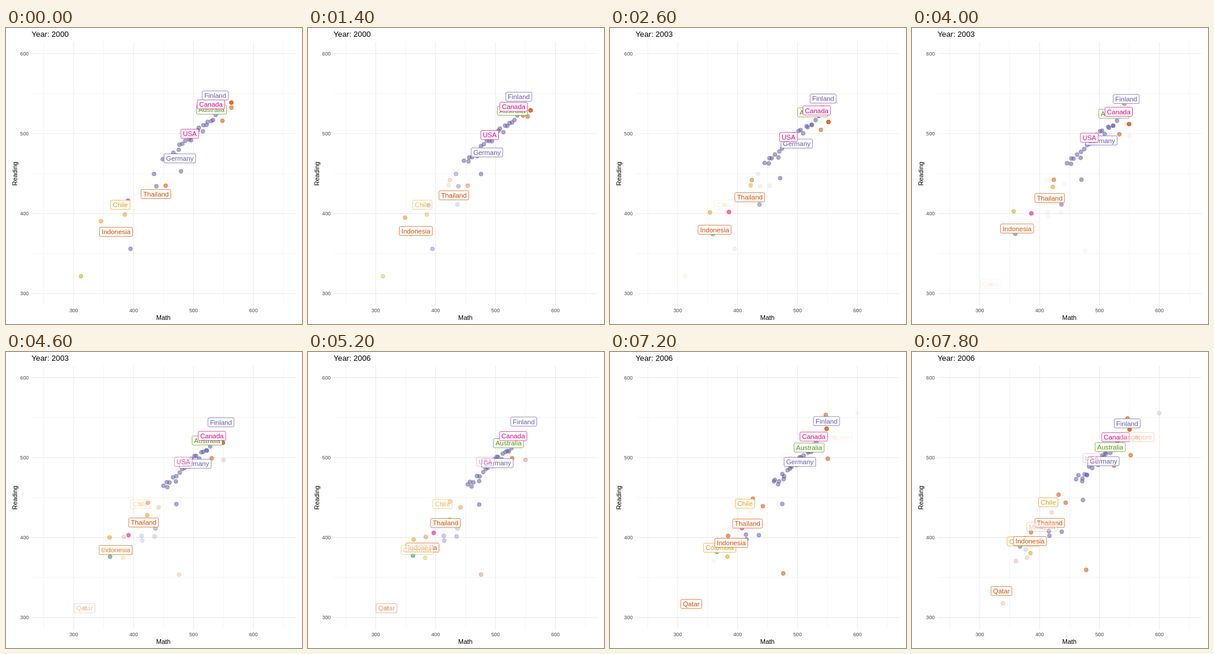
Write an HTML page with a canvas that moves like this. It is 504 px wide and 504 px high and loops after 8000 ms.

```html
<!DOCTYPE html>
<html lang="en">
<head>
<meta charset="utf-8">
<title>Reading and math scores</title>
<style>
  html, body { margin: 0; width: 100%; height: 100%; overflow: hidden; background: #fff; }
  canvas { display: block; }
</style>
</head>
<body>
<canvas id="stage" width="504" height="504"></canvas>
<script>
const ctx = document.getElementById("stage").getContext("2d");
const FONT = '"Liberation Sans", Arial, sans-serif';
const FRAME_MS = 200, FRAMES = 40, STEPS = 12, CYCLE = 16, LAST_STEPS = 4;
const AFRICA = "#1A9268", ASIA = "#D14E00", EUROPE = "#645DA7",
      NORTH = "#E0007F", OCEANIA = "#559712", SOUTH = "#E09E12";

// Extent of the European cluster in each survey, and its height at x = 310.
const SURVEYS = [
  { year: 2000, left: 268, right: 362, height: 193 },
  { year: 2003, left: 262, right: 358, height: 194 },
  { year: 2006, left: 277, right: 352, height: 198 },
  { year: 2009, left: 280, right: 352, height: 195 }
];

// Each country has one position per survey, beginning with survey number `first`.
const countries = [];
function add(name, color, first, ...path) {
  countries.push({ name, color, first, path });
}
const dot = (...args) => add("", ...args);

// A dot that joins in 2006 and then drifts with the general trend.
const newcomer = (color, x, y) => dot(color, 2, [x, y], [x + 2, y - 8]);

// Pseudo-random value from -1 to 1.
function jitter(seed) {
  const n = Math.sin(seed * 12.9898) * 43758.5453;
  return 2 * (n - Math.floor(n)) - 1;
}

function addCluster(count) {
  for (let i = 0; i < count; i++) {
    dot(EUROPE, 0, ...SURVEYS.map(({ left, right, height }, survey) => {
      const x = left + (right - left) * (i + 0.5) / count + 3 * jitter(i + 100 * survey);
      const y = height - 0.87 * (x - 310) + 8 * jitter(i + 50) + 4 * jitter(i + 70 * survey);
      return [x, y];
    }));
  }
}

addCluster(24);
dot(EUROPE, 0, [298, 244], [288, 258], [294, 261], [291, 252]);
dot(EUROPE, 0, [252, 248.5]);
dot(EUROPE, 0, [256, 269.5]);
dot(EUROPE, 0, [212, 376]);
dot(EUROPE, 1, [254.5, 300.5]);
newcomer(EUROPE, 231, 313);
newcomer(EUROPE, 232, 321);
newcomer(EUROPE, 253, 314);
dot(EUROPE, 3, [193.5, 336.5]);

dot(ASIA, 0, [272, 268.5]);
// Two countries share nearly the same scores.
for (let i = 0; i < 2; i++) {
  dot(ASIA, 0, [383.7, 127], [369.7, 166.6], [368.3, 130.3], [370.5, 132]);
}
dot(ASIA, 0, [384, 135.5], [354, 181], [343, 181], [344, 193.5]);
dot(ASIA, 0, [368.5, 158], [361, 131], [367.5, 105.3], [367, 113]);
dot(ASIA, 1, [241.5, 259], [241.5, 252], [249.5, 243]);
newcomer(ASIA, 370.3, 183.7);
newcomer(ASIA, 259.7, 264.6);
newcomer(ASIA, 200.6, 315);
newcomer(ASIA, 294.6, 379);
dot(ASIA, 3, [421, 104]);
dot(ASIA, 3, [238, 273]);
dot(ASIA, 3, [155, 428]);
dot(ASIA, 3, [196, 350]);

dot(AFRICA, 1, [175.3, 351], [181, 343.5], [184, 331]);
dot(NORTH, 0, [207.7, 294], [201.5, 317], [223, 301.5], [230, 295]);
dot(NORTH, 3, [177, 356]);
dot(SOUTH, 0, [127.7, 422.7]);
dot(SOUTH, 0, [202.3, 317.6]);
dot(SOUTH, 0, [161.7, 329], [172, 311], [185.5, 325.3], [193, 317]);
dot(SOUTH, 1, [239.5, 268], [242.5, 298], [243, 293]);
newcomer(SOUTH, 199.6, 350.5);

// Named countries, in drawing order
add("Australia", OCEANIA, 0, [350, 139], [344, 144.5], [339.5, 163], [337.5, 162]);
add("Canada", NORTH, 0, [349, 130], [352.5, 142.5], [347, 143.7], [346.5, 145]);
add("Chile", SOUTH, 0, [194.7, 301]);
add("Chile", SOUTH, 2, [229, 259], [232, 256]);
add("Colombia", SOUTH, 2, [186, 337], [189.5, 322.5]);
add("Finland", EUROPE, 0, [356.3, 114.8], [364.3, 121.3], [369.5, 116.4], [366.5, 121.5]);
add("Germany", EUROPE, 0, [296, 222], [322.4, 191.8], [322.4, 187.5], [326, 186]);
add("Indonesia", ASIA, 0, [187.4, 347], [176.2, 342.8], [208.3, 326], [201, 322]);
add("Malaysia", ASIA, 3, [221.3, 297.7]);
add("Qatar", ASIA, 2, [133.7, 436.3], [152.3, 407]);
add("Singapore", ASIA, 3, [382.7, 145]);
add("Thailand", ASIA, 0, [255.3, 282.7], [234.5, 289.3], [234, 292.5], [234.5, 291]);
add("USA", NORTH, 0, [313, 180], [302, 186.8]);
add("USA", NORTH, 3, [306.3, 180.5]);

function line(x1, y1, x2, y2, width) {
  ctx.strokeStyle = "#ebebeb";
  ctx.lineWidth = width;
  ctx.beginPath();
  ctx.moveTo(x1, y1);
  ctx.lineTo(x2, y2);
  ctx.stroke();
}

function text(value, x, y, size, color, align = "left") {
  ctx.font = `${size}px ${FONT}`;
  ctx.fillStyle = color;
  ctx.textAlign = align;
  ctx.fillText(value, x, y);
}

function drawChart(year) {
  ctx.globalAlpha = 1;
  ctx.fillStyle = "#fff";
  ctx.fillRect(0, 0, 504, 504);
  for (let x = 64.3; x < 493; x += 102) line(x, 23.5, x, 472, 0.53);
  for (let y = 111.6; y < 472; y += 136.2) line(43.5, y, 493, y, 0.53);
  for (let i = 0; i < 4; i++) {
    const x = 115.3 + 102 * i, y = 43.5 + 136.2 * i;
    line(x, 23.5, x, 472, 1.07);
    line(43.5, y, 493, y, 1.07);
    text(300 + 100 * i, x, 484, 8.8, "#4d4d4d", "center");
    text(600 - 100 * i, 38.7, y + 3.3, 8.8, "#4d4d4d", "right");
  }
  text("Year: " + year, 43.5, 15, 13.2, "#000");
  text("Math", 268, 497, 11, "#000", "center");
  ctx.save();
  ctx.translate(19, 248);
  ctx.rotate(-Math.PI / 2);
  text("Reading", 0, 0, 11, "#000", "center");
  ctx.restore();
}

function pose(country, segment, step) {
  const from = country.path[segment - country.first];
  const to = country.path[segment + 1 - country.first];
  const fade = step / STEPS;
  if (!from && !to) return null;
  if (!to) return { country, x: from[0], y: from[1], alpha: 1 - fade };
  if (!from) return { country, x: to[0], y: to[1], alpha: fade };
  // The last path entries hold the place reached when the loop is cut.
  const move = step / (segment === 2 ? LAST_STEPS : STEPS);
  return {
    country, alpha: 1,
    x: from[0] + (to[0] - from[0]) * move,
    y: from[1] + (to[1] - from[1]) * move
  };
}

// The translucent outline overlaps the fill, which gives a darker rim.
function drawPoint({ country, x, y, alpha }) {
  ctx.globalAlpha = 0.53 * alpha;
  ctx.fillStyle = ctx.strokeStyle = country.color;
  ctx.lineWidth = 0.9;
  ctx.beginPath();
  ctx.arc(x, y, 3.4, 0, 2 * Math.PI);
  ctx.fill();
  ctx.stroke();
}

function drawLabel({ country, x, y, alpha }) {
  ctx.globalAlpha = alpha;
  ctx.font = `11.38px ${FONT}`;
  const width = ctx.measureText(country.name).width + 7, height = 15.5;
  ctx.beginPath();
  ctx.roundRect(x - width / 2, y - height / 2, width, height, 2);
  ctx.fillStyle = "#fff";
  ctx.fill();
  ctx.strokeStyle = country.color;
  ctx.lineWidth = 0.7;
  ctx.stroke();
  text(country.name, x, y + 4.1, 11.38, country.color, "center");
}

function render(now) {
  const frame = Math.floor(now / FRAME_MS) % FRAMES;
  const segment = Math.max(0, Math.floor((frame - 4) / CYCLE));
  const step = Math.min(STEPS, Math.max(0, frame - 3 - CYCLE * segment));
  drawChart(SURVEYS[segment + (step > STEPS / 2 ? 1 : 0)].year);
  // Fading countries lie on top of the others.
  const poses = countries.map(c => pose(c, segment, step))
    .filter(p => p && p.alpha > 0)
    .sort((a, b) => (a.alpha < 1) - (b.alpha < 1));
  poses.forEach(drawPoint);
  poses.filter(p => p.country.name).forEach(drawLabel);
}

const start = performance.now();
function tick() {
  render(performance.now() - start);
  requestAnimationFrame(tick);
}
tick();
</script>
</body>
</html>
```
